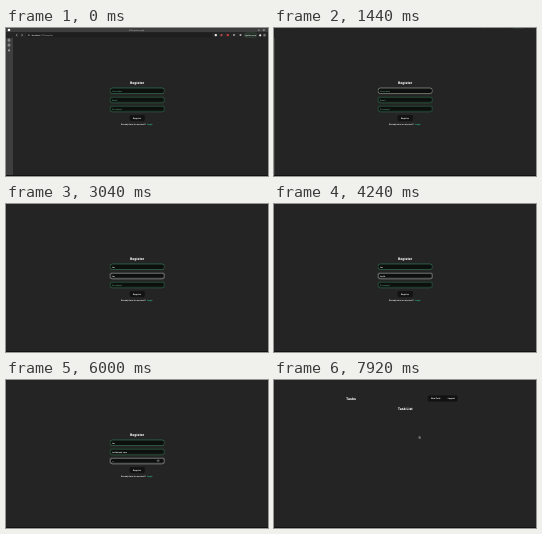
Recreate the animation shown at these times as an HTML page. Size 262 by 148 pixels, loop 8 s.

```html
<!DOCTYPE html>
<html lang="en">
<head>
<meta charset="utf-8">
<title>Register</title>
<style>
  html, body { margin: 0; width: 100%; height: 100%; overflow: hidden; background: #242424; }
  /* ten units per stage pixel */
  svg { display: block; width: 100vw; height: 100vh; }
  text { font: 600 20px Inter, "Noto Sans", sans-serif; fill: #fff; text-rendering: geometricPrecision; }
  .heading { font-size: 34px; font-weight: 800; }
  .mid { text-anchor: middle; }
  .label { font-weight: 700; }
  .hint { fill: #58987a; }
  .link { fill: #2fc487; font-weight: 700; }
  .ui { fill: #f0f0f0; font-size: 19px; }
  .dim { fill: #9c9c9c; }
  .field { fill: #0d0f0e; stroke: #3f9a68; stroke-width: 5; }
  .button { fill: #121212; stroke: #121212; stroke-width: 5; }
  .caret { fill: #eee; }

  .anim { animation: 8s step-end -20ms infinite; }
  .top { animation-name: top; }
  .side { animation-name: side; }
  .form { animation-name: form; }
  .tasks { animation-name: tasks; }
  .name-ring { animation-name: name-ring; }
  .mail-ring { animation-name: mail-ring; }
  .pass-ring { animation-name: pass-ring; }
  .name-hint { animation-name: name-hint; }
  .mail-hint { animation-name: mail-hint; }
  .pass-hint { animation-name: pass-hint; }
  .name-text { animation-name: name-text; }
  .mail-text { animation-name: mail-text; }
  .pass-text { animation-name: pass-text; }
  .name-caret { animation-name: name-caret; }
  .eye { animation-name: eye; }
  .submit { animation-name: submit; }
  .pointer { animation-name: pointer; }

  @keyframes top { 18% { transform: translateY(-88px) } 19%, to { transform: translateY(-130px) } }
  @keyframes side { 18% { transform: translateX(-58px) } 19%, to { transform: translateX(-80px) } }
  @keyframes form { 0% { opacity: 1 } 93%, to { opacity: 0 } }
  @keyframes tasks { 0% { opacity: 0 } 93%, to { opacity: 1 } }

  @keyframes name-ring { 9% { stroke: #c9ccb8 } 33%, to { stroke: #3f9a68 } }
  @keyframes mail-ring { 33% { stroke: #fff } 69%, to { stroke: #3f9a68 } }
  @keyframes pass-ring { 69% { stroke: #fff } 88%, to { stroke: #3f9a68 } }

  @keyframes name-hint { 28%, to { opacity: 0 } }
  @keyframes mail-hint { 36%, to { opacity: 0 } }
  @keyframes pass-hint { 74%, to { opacity: 0 } }

  @keyframes name-text {
    0% { clip-path: inset(0 100% 0 0) } 28% { clip-path: inset(0 60% 0 0) }
    29%, to { clip-path: inset(0) }
  }
  @keyframes mail-text {
    0% { clip-path: inset(0 100% 0 0) } 36% { clip-path: inset(0 93% 0 0) }
    38% { clip-path: inset(0 80% 0 0) } 53% { clip-path: inset(0 66% 0 0) }
    56% { clip-path: inset(0 54% 0 0) } 58% { clip-path: inset(0 46% 0 0) }
    59% { clip-path: inset(0 34% 0 0) } 61% { clip-path: inset(0 30% 0 0) }
    62% { clip-path: inset(0 27% 0 0) } 64% { clip-path: inset(0 23% 0 0) }
    65% { clip-path: inset(0 19% 0 0) } 67%, to { clip-path: inset(0) }
  }
  @keyframes pass-text {
    0% { clip-path: inset(0 100% 0 0) } 74% { clip-path: inset(0 50% 0 0) }
    75%, to { clip-path: inset(0) }
  }
  @keyframes name-caret { 0% { opacity: 0 } 9% { opacity: 1 } 15% { opacity: 0 } 22% { opacity: 1 } 28%, to { opacity: 0 } }
  @keyframes eye { 0% { opacity: 0 } 74% { opacity: 1 } 88%, to { opacity: 0 } }
  @keyframes submit { 87%, to { stroke: #e4e4e4 } }
  @keyframes pointer {
    0% { opacity: 0; transform: translate(1350px, 735px) }
    82% { opacity: 1; transform: translate(1350px, 735px); animation-timing-function: ease-in-out }
    89% { opacity: 1; transform: translate(1328px, 918px) }
    96% { opacity: 1; transform: translate(1328px, 918px); animation-timing-function: ease-out }
    99%, to { opacity: 1; transform: translate(1450px, 560px) }
  }
</style>
</head>
<body>
<svg viewBox="0 0 2620 1480" preserveAspectRatio="none">
  <rect width="2620" height="1480" fill="#242424"/>

  <g class="anim form">
    <text class="heading mid" x="1311" y="558">Register</text>

    <rect class="field anim name-ring" x="1040" y="600" width="544" height="56" rx="24"/>
    <text class="hint anim name-hint" x="1060" y="635">Username</text>
    <text class="anim name-text" x="1060" y="635">tes</text>
    <rect class="caret anim name-caret" x="1056" y="614" width="3" height="26"/>

    <rect class="field anim mail-ring" x="1040" y="690" width="544" height="56" rx="24"/>
    <text class="hint anim mail-hint" x="1060" y="725">Email</text>
    <text class="anim mail-text" x="1060" y="725">tes@email.com</text>

    <rect class="field anim pass-ring" x="1040" y="780" width="544" height="56" rx="24"/>
    <text class="hint anim pass-hint" x="1060" y="815">Password</text>
    <text class="anim pass-text" x="1060" y="815">••</text>
    <g class="anim eye" fill="none" stroke="#ddd" stroke-width="4">
      <path d="M1511 807q11-14 22 0q-11 14-22 0"/>
      <circle cx="1522" cy="807" r="3"/>
    </g>

    <rect class="button anim submit" x="1239" y="872" width="146" height="56" rx="12"/>
    <text class="label mid" x="1311" y="907">Register</text>
    <text class="mid" x="1307" y="973">Already have an account? <tspan class="link" dx="8">Login</tspan></text>
  </g>

  <g class="anim tasks">
    <text class="heading" x="720" y="195">Tasks</text>
    <rect class="button" x="1542" y="155" width="290" height="58" rx="12"/>
    <text class="label" x="1570" y="191">New Task</text>
    <text class="label" x="1738" y="191">Logout</text>
    <text class="heading mid" x="1312" y="299">Task List</text>
  </g>

  <g class="anim side">
    <rect y="97" width="70" height="1373" fill="#3e3e3e"/>
    <g fill="none" stroke="#e4e4e4" stroke-width="6">
      <rect x="21" y="114" width="18" height="16" rx="4"/>
      <rect x="21" y="163" width="18" height="16" rx="4"/>
      <path d="M30 212v22M19 223h22"/>
    </g>
  </g>

  <g class="anim top">
    <rect width="2620" height="98" fill="#252525"/>
    <rect width="2620" height="40" fill="#3e3e3e"/>
    <circle cx="30" cy="20" r="13" fill="#fff"/>
    <circle cx="1240" cy="21" r="6" fill="#bbb"/>
    <text class="ui dim" x="1254" y="28">Register page</text>
    <path d="M2520 21h18M2570 13l16 16m0-16l-16 16" stroke="#eee" stroke-width="5"/>
    <path d="M113 62l-11 9 11 9M155 62l11 9-11 9" fill="none" stroke="#eee" stroke-width="5"/>
    <rect x="205" y="48" width="1850" height="44" rx="20" fill="#1e1e1e"/>
    <circle cx="229" cy="71" r="7" fill="#ccc"/>
    <text class="ui" x="258" y="77">localhost<tspan class="dim">:5173/register</tspan></text>
    <circle cx="2098" cy="71" r="12" fill="#f0f0f0"/>
    <circle cx="2155" cy="71" r="12" fill="#b04a4a"/>
    <circle cx="2218" cy="71" r="12" fill="#d63c3c"/>
    <circle cx="2280" cy="71" r="10" fill="#a5a5a5"/>
    <circle cx="2345" cy="71" r="10" fill="#b5b5b5"/>
    <rect x="2384" y="50" width="122" height="42" rx="20" fill="#1e2a22" stroke="#5d8a6c" stroke-width="3"/>
    <text class="ui mid" x="2445" y="77">Update now</text>
    <circle cx="2542" cy="73" r="11" fill="#f0f0f0"/>
    <path d="M2574 64h22M2574 72h22M2574 80h22" stroke="#e4e4e4" stroke-width="4"/>
  </g>

  <rect y="1470" width="2620" height="10" fill="#141114"/>

  <path class="anim pointer" d="M0 0v25l6-5 5 9 5-3-5-9h8z" fill="#fff" stroke="#111" stroke-width="2"/>
</svg>
</body>
</html>
```
